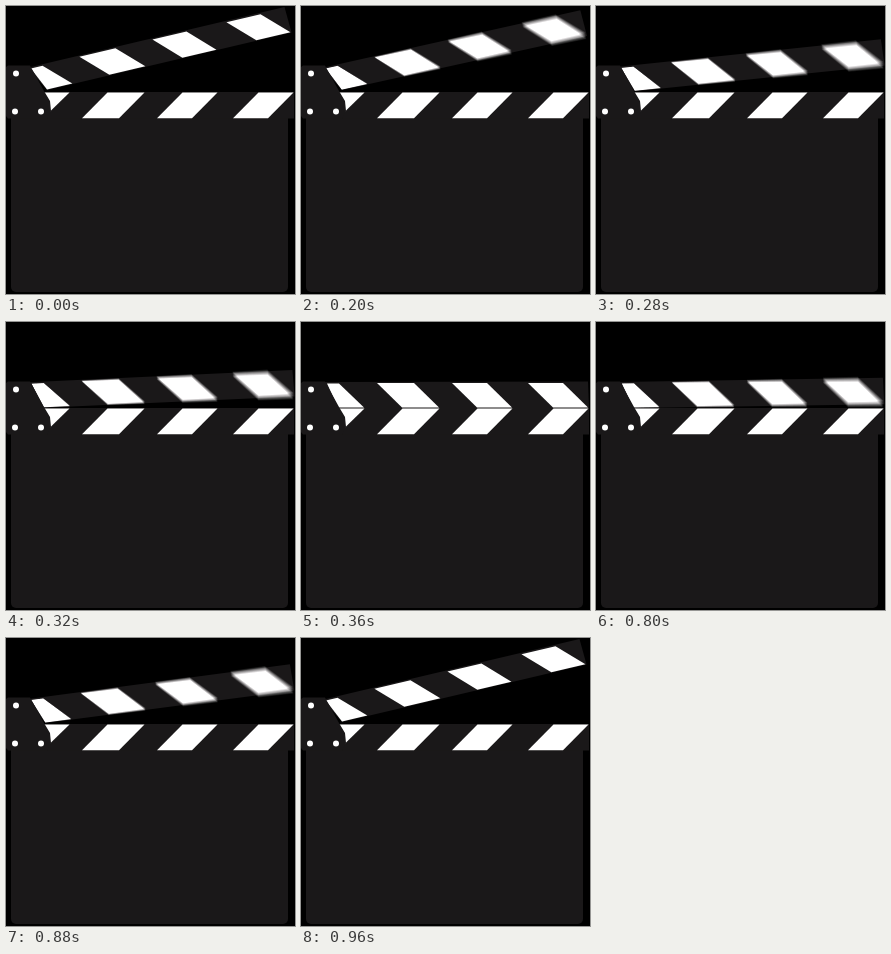
These frames come from a looping animation (289x288 px, 1000 ms). An HTML page with a canvas:

```html
<!DOCTYPE html>
<html>
<head>
<meta charset="utf-8">
<style>
html, body { margin: 0; height: 100%; overflow: hidden; background: #000; }
canvas { display: block; }
</style>
</head>
<body>
<canvas id="stage" width="289" height="288"></canvas>
<script>
const ctx = document.getElementById('stage').getContext('2d');
const INK = '#1a1819', OPEN = 13.2, SWING = 160, SAMPLES = 13, SHUTTER = 1.5;
const HINGE = [30, 67];

const clamp = v => Math.min(1, Math.max(0, v));

function poly(color, ...pts) {
  ctx.fillStyle = color;
  ctx.beginPath();
  for (let i = 0; i < pts.length; i += 2) ctx.lineTo(pts[i], pts[i + 1]);
  ctx.fill();
}

function rotated(deg, draw) {
  ctx.save();
  ctx.translate(...HINGE);
  ctx.rotate(-deg * Math.PI / 180);
  ctx.translate(-HINGE[0], -HINGE[1]);
  draw();
  ctx.restore();
}

function stickStripes() {
  poly('#fff', 26, 61.5, 38, 61.5, 63, 85.5, 37, 85.5);
  for (const [x, w] of [[76, 37], [151, 35], [227, 35]])
    poly('#fff', x, 61, x + w, 61, x + w + 25, 85.5, x + 25, 85.5);
}

function barStripes() {
  poly('#fff', 36, 86.5, 63.5, 86.5, 44, 105.5);
  for (const [x, w] of [[76, 37], [151, 35], [227, 35]])
    poly('#fff', x + 25.5, 86.5, x + w + 25.5, 86.5, x + w, 112.3, x, 112.3);
}

function draw(angle, moving) {
  ctx.fillStyle = '#000';
  ctx.fillRect(0, 0, 289, 288);

  ctx.fillStyle = INK;
  ctx.beginPath();
  ctx.roundRect(5, 105, 277, 181, 5);
  ctx.fill();
  ctx.fillRect(30, 86, 258, 26.5);
  barStripes();

  rotated(angle, () => poly(INK, 23, 60, 287, 59.5, 288, 86, 37, 86));
  if (moving) {
    // Motion blur: sum the stripes over a small range of angles
    ctx.globalCompositeOperation = 'lighter';
    ctx.globalAlpha = 1 / SAMPLES;
    for (let i = 0; i < SAMPLES; i++)
      rotated(angle + (i / (SAMPLES - 1) - 0.5) * SHUTTER, stickStripes);
    ctx.globalAlpha = 1;
    ctx.globalCompositeOperation = 'source-over';
  } else {
    rotated(angle, stickStripes);
  }

  poly(INK, 0, 61, 2, 59.5, 24, 59.5, 38, 85, 44, 95, 45, 105, 41, 112.5, 2, 112.5, 0, 110);
  ctx.fillStyle = '#fff';
  for (const [x, y] of [[10, 67.5], [9, 105.5], [35, 105.5]]) {
    ctx.beginPath();
    ctx.arc(x, y, 3, 0, 7);
    ctx.fill();
  }
}

function frame() {
  const t = Math.floor(performance.now() % 1000 / 40) * 40;
  const shut = clamp((t - 191) / SWING) - clamp((t - 790) / SWING);
  draw(OPEN * (1 - shut), shut > 0 && shut < 1);
  requestAnimationFrame(frame);
}
frame();
</script>
</body>
</html>
```
